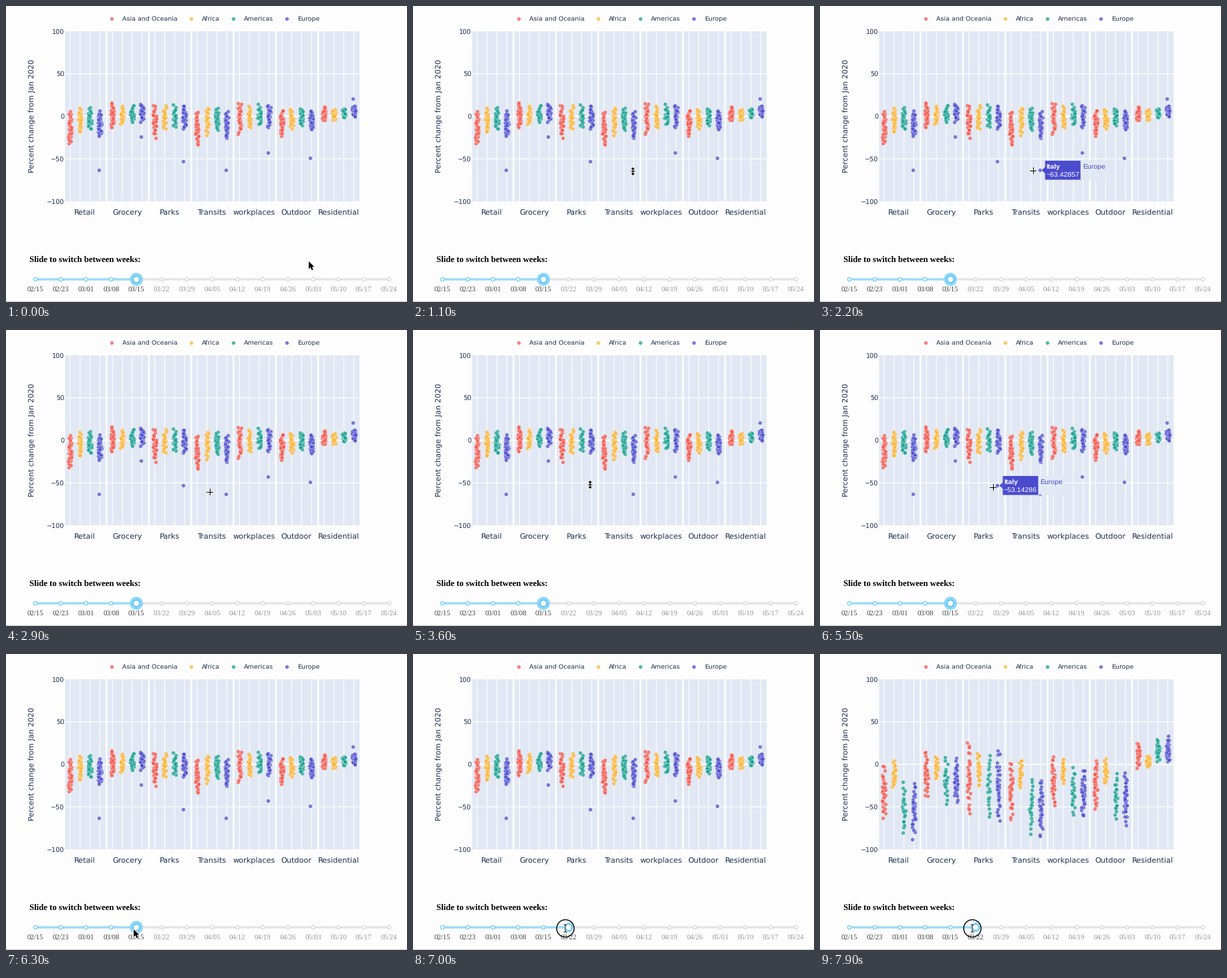
Write a matplotlib script that moves like this. It is 600 px wide and 444 px high and loops after 8000 ms.

```python
import numpy as np
import matplotlib.pyplot as plt
from matplotlib.animation import FuncAnimation
from matplotlib.colors import to_rgba
from matplotlib.patches import Circle, Polygon, Rectangle

plt.rcParams["text.hinting"] = "none"

W, H, DPI = 600, 444, 100
FRAMES, STEP = 80, 100
PX = 72 / DPI

INK, PANEL, INDIGO = "#1e3152", "#e1e8f4", "#4b4bce"
# name, colour, legend x, countries
REGIONS = [("Asia and Oceania", "#f4564c", 158, 32), ("Africa", "#fdb32f", 277, 21),
           ("Americas", "#119f8d", 340, 21), ("Europe", INDIGO, 420, 33)]
PLACES = ["Retail", "Grocery", "Parks", "Transits", "workplaces", "Outdoor", "Residential"]
WEEKS = ("02/15 02/23 03/01 03/08 03/15 03/22 03/29 04/05 "
         "04/12 04/19 04/26 05/03 05/10 05/17 05/24").split()
LEFT, PITCH, WIDE = 88.5, 63.33, 60.6
RAIL = 410

# mean and spread go by place; gain, reach and shift go by region
EARLY = dict(mean=[-9, 2, -3, -10, -1, -5, 3.5], spread=[19, 14, 18, 21, 17, 15, 8],
             gain=[1.3, 0.5, 0.5, 1.2], reach=[1, 0.72, 0.68, 0.76], shift=[-1, 0, 2, 2])
LATE = dict(mean=[-38, -14, -19, -36, -24, -28, 12.5], spread=[31, 26, 40, 33, 29, 29, 14],
            gain=[0.85, 0.3, 1.35, 1.4], reach=[1, 0.5, 0.95, 1], shift=[0, 0, 0, 0])
ITALY = [-63.4, -24, -53.14286, -63.42857, -43, -49, 21]

fig = plt.figure(figsize=(W / DPI, H / DPI), dpi=DPI, facecolor="#fdfdfe")
ax = fig.add_axes([0, 0, 1, 1])
ax.set_xlim(0, W)
ax.set_ylim(H, 0)
ax.axis("off")


def level(v):
    return 165.5 - 1.275 * v


def column(place, region):
    return 96 + PITCH * place + 14.8 * region


def week_x(i):
    return 44 + 37.79 * i


def label(x, y, s, size, color=INK, font="DejaVu Sans", **kw):
    kw.setdefault("va", "baseline")
    return ax.text(x, y, s, fontsize=size * PX, color=color, family=font, **kw)


def line(xs, ys, color, width, z=1):
    return ax.plot(xs, ys, color=color, lw=width * PX, zorder=z, snap=False,
                   solid_capstyle="butt")[0]


def rect(x, y, w, h, color, z, **kw):
    return ax.add_patch(Rectangle((x, y), w, h, fc=color, lw=0, zorder=z, snap=False, **kw))


def disc(x, y, r, fill, edge="none", width=0, z=5, **kw):
    return ax.add_patch(Circle((x, y), r, fc=fill, ec=edge, lw=width * PX, zorder=z, **kw))


def dots(xs, ys, color):
    return ax.scatter(xs, ys, s=(5.7 * PX) ** 2, facecolors=[to_rgba(color, 0.74)],
                      edgecolors=[(1, 1, 1, 0.6)], lw=0.55 * PX, zorder=3)


def strips(week, seed, italy=()):
    rng = np.random.default_rng(seed)
    made = []
    for r, (_, color, _, count) in enumerate(REGIONS):
        xs, ys = [], []
        for p in range(len(PLACES)):
            mid = week["mean"][p] * week["gain"][r] + week["shift"][r]
            half = week["spread"][p] * week["reach"][r]
            u = np.linspace(-1, 1, count) + rng.normal(0, 0.04, count)
            xs.extend(column(p, r) + rng.uniform(-2.7, 2.3, count))
            ys.extend(level(mid + half * u * (0.65 + 0.35 * u * u)))
        if color == INDIGO:
            for p, v in enumerate(italy):
                xs.append(column(p, r) - 1.6)
                ys.append(level(v))
        order = rng.permutation(len(xs))
        made.append(dots(np.array(xs)[order], np.array(ys)[order], color))
    return made


# chart
for p, name in enumerate(PLACES):
    x = LEFT + PITCH * p
    rect(x, 38, WIDE, 255, PANEL, 0)
    for r in range(len(REGIONS)):
        line([column(p, r)] * 2, [38, 293], "white", 1.1)
    for v in (-50, 0, 50):
        line([x, x + WIDE], [level(v)] * 2, "white", 1.8 if v == 0 else 1.2)
    label(x + WIDE / 2 - 0.8, 312.4, name, 11.2, ha="center")
for v in range(-100, 101, 50):
    label(87, level(v) + 3.5, str(v).replace("-", "\u2212"), 9.7, ha="right")
label(38.3, 165, "Percent change from Jan 2020", 11.2, rotation=90, ha="center", va="center")
for name, color, x, _ in REGIONS:
    dots([x], [18.7], color)
    label(x + 16, 22.3, name, 9.5)
line([0, W], [443.5] * 2, "#c4c4c8", 1)

early = strips(EARLY, 7, ITALY)
late = strips(LATE, 11)

# slider
label(35, 384.2, "Slide to switch between weeks:", 12.7, "black", "Liberation Serif",
      weight="bold")
line([41, 576], [RAIL] * 2, "#e4e4e6", 3.2, 4)
track = line([41, 194], [RAIL] * 2, "#9adcfb", 3.2, 4.1)
stops = [disc(week_x(i), RAIL, 2.7, "white", width=1.6) for i in range(len(WEEKS))]
marks = [label(week_x(i), 427.9, s, 10.8, font="Liberation Serif", ha="center")
         for i, s in enumerate(WEEKS)]
glow = [disc(0, RAIL, 9.8, "#8fd6fa", z=6)]
halo = [disc(0, RAIL, r, "#57c5f7", z=6, alpha=0.14) for r in (7, 8, 9)]
knob = disc(0, RAIL, 5, "white", "#57c5f7", 1.8, 7)

# hover label
tip_name = rect(0, 0, 40, 28.5, "#e2e9f5", 8, alpha=0.88)
tip_box = rect(0, 0, 53, 28.5, INDIGO, 9)
tip_arrow = ax.add_patch(Polygon([(0, 0)] * 3, fc=INDIGO, lw=0, zorder=9))
tip_text = [label(0, 0, s, 10.5, c, "Liberation Sans", weight=w, zorder=10)
            for s, c, w in (("Italy", "white", "bold"), ("", "white", "normal"),
                            ("Europe", INDIGO, "normal"))]
tip = [tip_name, tip_box, tip_arrow, *tip_text]


# cursors
def mirror(half):
    """Close a right-hand outline by reflecting it to the left."""
    return np.array(half + [(-x, y) for x, y in half[::-1]], float)


SHAPES = {
    "arrow": np.array([(0, 0), (0, 11.5), (2.7, 9.1), (4.6, 13.4), (6.6, 12.5),
                       (4.8, 8.4), (8.3, 8.2)]),
    "cross": mirror([(0.5, -5), (0.5, -0.5), (5, -0.5), (5, 0.5), (0.5, 0.5), (0.5, 5)]),
    "resize": mirror([(0, -6.2), (2.8, -3), (0.7, -3), (0.7, -0.5), (3.4, -0.5), (3.4, 0.5),
                      (0.7, 0.5), (0.7, 3), (2.8, 3), (0, 6.2)]),
    "beam": mirror([(0, -5.6), (2.6, -6.4), (2.6, -5.6), (0.5, -4.6), (0.5, 4.6),
                    (2.6, 5.6), (2.6, 6.4), (0, 5.6)]),
}
pointers = {}
for kind, pts in SHAPES.items():
    rim = 2 if kind in ("arrow", "resize") else 1
    pointers[kind] = [ax.add_patch(Polygon(pts, fc=c, ec=c, lw=w * PX, zorder=z))
                      for c, w, z in (("white", rim, 20), ("black", 0, 21))]
ring = disc(0, 0, 13, "none", "black", 1.4, 19)

# cursor path: time, x, y
PATH = [(200, 453, 383), (1000, 329, 248), (1400, 329, 248), (1800, 319, 247),
        (2700, 319, 247), (3300, 265, 232), (3800, 265, 232), (4200, 259, 236),
        (5600, 259, 236), (6300, 191, 413), (6500, 191, 413), (6700, 212, 419),
        (6900, 228, 411.6)]
PRESS, REFRESH = 6400, 7400


def cursor_at(t):
    for (t0, x0, y0), (t1, x1, y1) in zip(PATH, PATH[1:]):
        if t < t1:
            u = max(0, (t - t0) / (t1 - t0))
            u = u * u * (3 - 2 * u)
            return x0 + (x1 - x0) * u, y0 + (y1 - y0) * u
    return PATH[-1][1:]


def cursor_kind(x, y, t):
    if t >= PRESS:
        return "beam"
    if not (LEFT < x < 529 and 38 < y < 293):
        return "arrow"
    return "resize" if (x - LEFT) % PITCH > 47 else "cross"


def show(items, on):
    for a in items:
        a.set_visible(on)


def place_tip(x, v):
    y = level(v)
    tip_box.set_xy((x + 8, y - 14.3))
    tip_name.set_xy((x + 61, y - 14.3))
    tip_arrow.set_xy([(x + 3, y), (x + 8.2, y - 5), (x + 8.2, y + 5)])
    for a, dx, dy in zip(tip_text, (9.5, 9.5, 64), (-2.6, 10.4, -2.6)):
        a.set_position((x + dx, y + dy))
    tip_text[1].set_text(f"\u2212{abs(v):.5f}")


def set_slider(i, pressed):
    x = week_x(i)
    track.set_xdata([41, x])
    for k, (stop, mark) in enumerate(zip(stops, marks)):
        stop.set_edgecolor("#86d4f8" if k <= i else "#dedee0")
        mark.set_color("#444444" if k <= i else "#999999")
    for a in (*glow, *halo, knob):
        a.center = (x, RAIL)
    show(glow, not pressed)
    show(halo, pressed)


def draw(n):
    t = n * STEP
    x, y = cursor_at(t)
    kind = cursor_kind(x, y, t)
    for name, pair in pointers.items():
        show(pair, name == kind)
        for a in pair:
            a.set_xy(SHAPES[name] + (x, y))
    pressed = t >= PRESS
    ring.set_visible(pressed)
    ring.center = (x, y)

    spots = [(column(p, 3) - 1.6, v) for p, v in enumerate(ITALY)]
    near = [s for s in spots if np.hypot(x - s[0], y - level(s[1])) < 13]
    hover = kind == "cross" and bool(near)
    show(tip, hover)
    if hover:
        place_tip(*near[0])

    set_slider(5 if pressed and x > 213 else 4, pressed)
    show(early, t < REFRESH)
    show(late, t >= REFRESH)
    return []


anim = FuncAnimation(fig, draw, frames=FRAMES, interval=STEP, repeat=True, repeat_delay=0)
plt.show()
```
